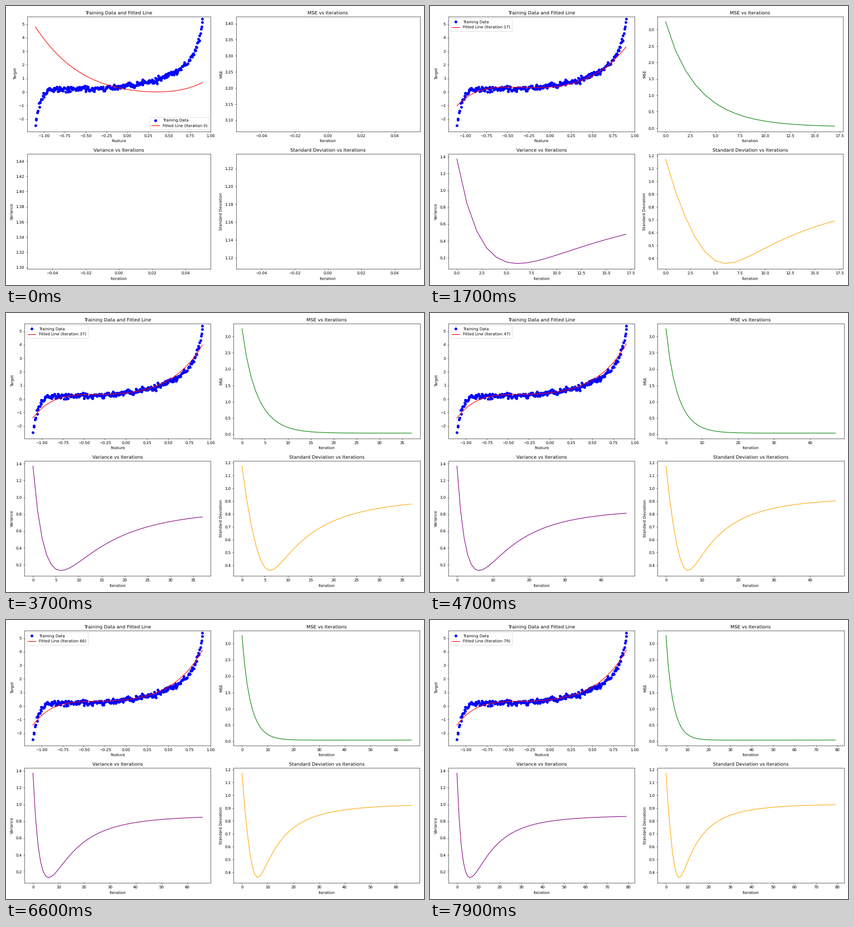
Animation, 750 px wide and 500 px high, one loop 8 s. Source, as a matplotlib script:

```python
import numpy as np
import matplotlib.pyplot as plt
from matplotlib.animation import FuncAnimation

STEPS, INTERVAL = 80, 100
plt.rcParams.update({"font.family": "DejaVu Sans", "text.hinting": "none"})

steps = np.arange(STEPS)


def decay(rate):
    return rate ** steps


# Training data: exponential trend with steep ends plus noise
rng = np.random.default_rng(42)
feature = np.linspace(-1.1, 0.9, 300)
feature[1:-1] += rng.uniform(-0.006, 0.006, 298)
target = (0.1 * (1 + feature ** 2) + 0.36 * np.exp(2.3 * feature)
          - 2.75 * np.exp(-(feature + 1.1) / 0.055)
          + 2.15 * np.exp((feature - 0.9) / 0.07)
          + rng.normal(0, 0.1, 300))

# Fitted quintic: final shape plus a fast and a slow error that die out
line_x = np.linspace(-1.1, 0.9, 200)
knots = [-1.1, -0.7, -0.25, 0.25, 0.5, 0.9]


def quintic(*values):
    return np.polyval(np.polyfit(knots, values, 5), line_x)


final = quintic(-1.42, 0.2, 0.36, 0.77, 1.42, 4.13)
fast = quintic(6.22, 1.97, 0.46, -0.1, -0.63, -0.13)
slow = quintic(0, -0.15, -0.27, -0.65, -0.75, -3.3)
fits = final + np.outer(decay(0.85), fast) + np.outer(decay(0.92), slow)

# Metrics per iteration
mse = 0.04 - 0.006 * decay(0.97) + 2.95 * decay(0.755) + 0.26 * decay(0.4)
variance = (0.868 - 0.409 * decay(0.955) - 1.245 * decay(0.9)
            + 2.16 * decay(0.69))

fig, axes = plt.subplots(2, 2, figsize=(15, 10), dpi=50)
fit_ax = axes[0, 0]
fit_ax.scatter(feature, target, color="blue", label="Training Data")
fit_line, = fit_ax.plot(line_x, fits[0], color="red")
fit_ax.set(title="Training Data and Fitted Line", xlabel="Feature", ylabel="Target",
           xlim=(-1.2, 1.0), ylim=(-2.9, 5.57))


def metric(ax, name, values, color):
    line, = ax.plot(steps[:1], values[:1], color=color)
    ax.set(title=f"{name} vs Iterations", xlabel="Iteration", ylabel=name)
    return ax, line, values


metrics = [
    metric(axes[0, 1], "MSE", mse, "green"),
    metric(axes[1, 0], "Variance", variance, "purple"),
    metric(axes[1, 1], "Standard Deviation", np.sqrt(variance), "orange"),
]


def arrange():
    """Lay out at double resolution, where text is measured more precisely."""
    with plt.rc_context({"text.hinting": "force_autohint"}):
        fig.dpi = 100
        fig.tight_layout()
        fig.dpi = 50


def update(k):
    fit_line.set_ydata(fits[k])
    fit_line.set_label(f"Fitted Line (Iteration {k})")
    fit_ax.legend(loc="best")
    for ax, line, values in metrics:
        line.set_data(steps[:k + 1], values[:k + 1])
        ax.relim()
        ax.autoscale_view()
    arrange()
    return []


anim = FuncAnimation(fig, update, frames=STEPS, interval=INTERVAL,
                     init_func=lambda: [], repeat=True, repeat_delay=0)
plt.show()
```
